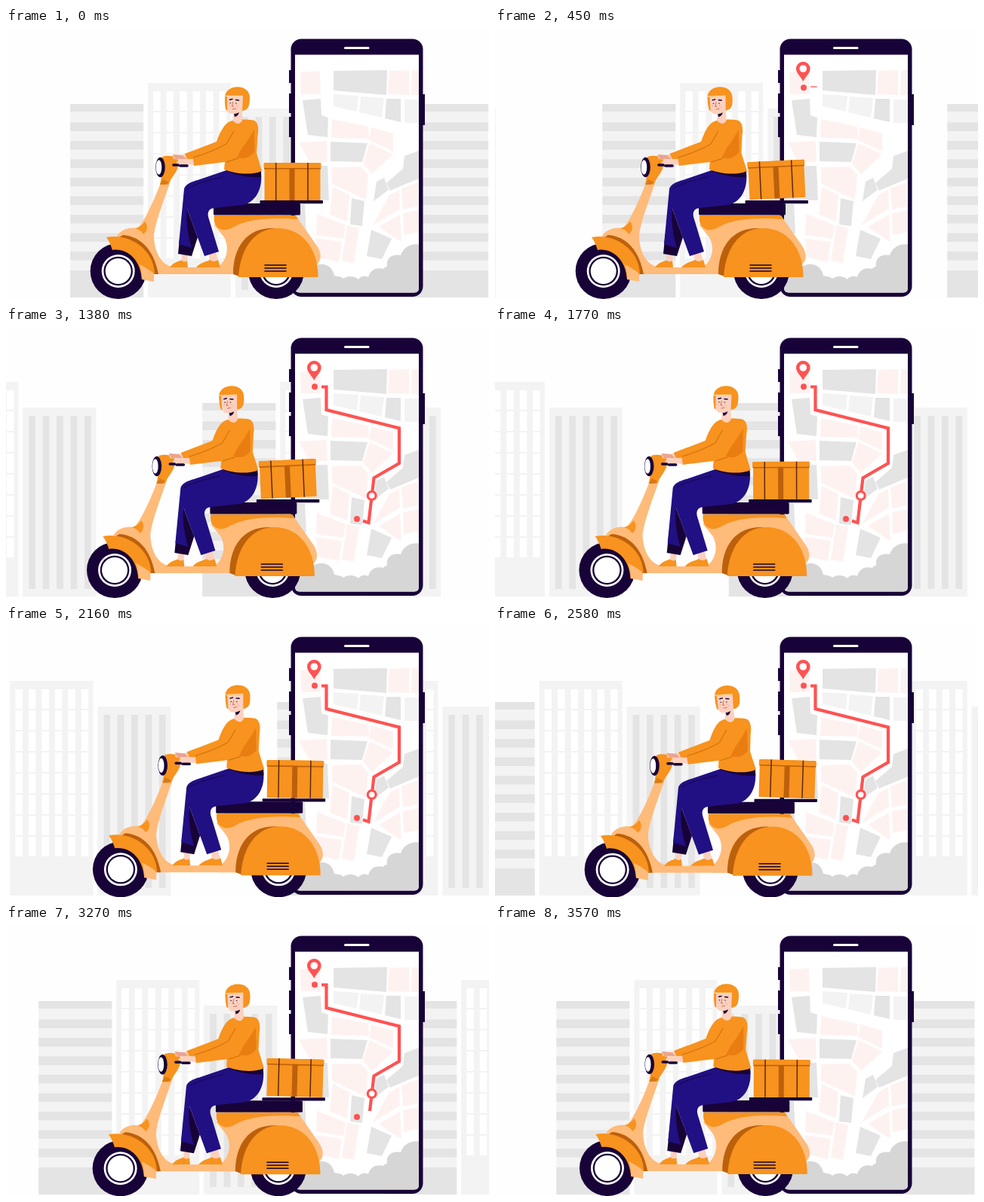
Animation, 640 px wide and 360 px high, one loop 3.6 s. Source, as an HTML page:

```html
<!DOCTYPE html>
<html lang="en">
<head>
<meta charset="utf-8">
<title>Scooter delivery</title>
<style>
  html, body { margin: 0; width: 100%; height: 100%; overflow: hidden; background: #fefefe; }
  svg { display: block; width: 100vw; height: 100vh; }
  .orange { fill: #f7931e } .light { fill: #ffbb7a } .brown { fill: #bd600b } .shade { fill: #e97d12 }
  .navy { fill: #180338 } .blue { fill: #211083 } .skin { fill: #fcd0be } .white { fill: #fff }
  .gray { fill: #e4e4e4 } .pale { fill: #f3f3f3 } .pink { fill: #fef2f1 } .red { fill: #ff5252 }
  .line { fill: none; stroke: #180338; stroke-linecap: round }
</style>
</head>
<body>
<svg viewBox="0 0 640 360">
  <clipPath id="wipe"><rect id="window" x="410" y="77" width="120" height="0"/></clipPath>
  <g id="city"></g>

  <g id="phone">
    <path class="navy" d="M375 56h3v17h-3zM375 87h3v26h-3zM375 118h3v27h-3zM551 88h4v41h-4z"/>
    <rect class="navy" x="377.500" y="14.500" width="175" height="342.500" rx="14"/>
    <path class="white" d="M383 35.500H547V345Q547 351.500 541 351.500H389Q383 351.500 383 345Z"/>
    <path d="M449.500 26.500H480" stroke="#fff" stroke-width="3" stroke-linecap="round"/>
    <g id="map"></g>
    <path fill="#d6d6d6" d="M383 322C395 311 403 318 409 316C420 310 433 316 435 329C440 330 444 330 447 333C452 329 462 329 467 334C470 329 476 329 480 331C482 322 490 317 500 320C501 318 503 317 505 317C503 305 512 300 523 302C526 292 536 286 547 287.500V345Q547 351.500 541 351.500H389Q383 351.500 383 345Z"/>
    <path clip-path="url(#wipe)" fill="none" stroke="#ff5252" stroke-width="4.200" d="M418 79.500H424.500V110L521 134.500V181L487.500 200.500L480.500 260L473 257.500"/>
    <g id="pin">
      <path class="red" d="M408.300 71C405 64 399 60 399 54a9.300 9.300 0 0 1 18.600 0C417.600 60 411.600 64 408.300 71Z"/>
      <circle class="white" cx="408.300" cy="54" r="4.800"/>
    </g>
    <circle id="start" class="red" cx="409" cy="79.300" r="4"/>
    <circle id="stop" cx="484.700" cy="224" r="5.400" fill="#fff" stroke="#ff5252" stroke-width="3.200"/>
    <circle id="end" class="red" cx="465" cy="255" r="4"/>
  </g>

  <g id="bike">
    <g id="wheels"></g>
    <path class="light" d="M207 200L218 203C209 230 196 262 196 278C197 300 208 318 226 318H280C290 312 298 295 289 278L276 262L285 249H384L411 288C419 299 418 309 412 314V327H197C193 300 175 282 147 277C152 267 165 264 174 266C184 258 200 220 207 200Z"/>
    <path class="brown" d="M155 275C180 277 196 296 202 327H194C190 300 177 284 150 278Z"/>
    <path class="orange" d="M133 278C162 272 196 293 197 326L180 334C178 307 160 292 141 295C139 289 137 283 133 278Z"/>
    <path class="light" d="M180 334C180 326 179 320 177 314C186 319 194 323 196 327V337Z"/>
    <path class="orange" d="M184 257C189 264 187 270 182 274C179 269 175 267 171 266C177 265 181 261 184 257Z"/>
    <path class="orange" d="M276 249H384L387 254C350 251 320 254 302 264C294 269 288 269 284 267C277 264 275 257 276 249Z"/>
    <path class="light" d="M280 327C298 322 301 300 306 290L320 300V327Z"/>
    <path class="brown" d="M301 327C301 290 320 264 356 266L334 295L312 331Z"/>
    <path class="orange" d="M308 331C310 294 328 268 357 266C394 264 414 296 413.500 331Z"/>
    <path class="line" stroke-width="1.600" d="M343 315h28M343 319h28M343 323h28"/>
    <rect class="navy" x="275" y="233" width="115" height="15.500" rx="1.500"/>
    <rect class="navy" x="336.500" y="229" width="83.500" height="4.300" rx="1"/>

    <g id="box">
      <path class="orange" d="M342.500 179H416.500V229H342.500Z"/>
      <rect class="orange" x="341.500" y="179" width="76" height="7.500" rx="1.500"/>
      <path class="brown" d="M342 186h75v1.600h-75zM375.500 186h7v43h-7z"/>
      <path d="M357.700 179V229M400 179V229" stroke="#5c2a12" stroke-width="1.500"/>
    </g>

    <path class="orange" d="M204 208C206 200 207 193 207 171C216 168 229 170 229 178C228 192 220 196 215 208Z"/>
    <path class="brown" d="M208 201L216 205L212 208H204Z" opacity=".5"/>
    <ellipse class="navy" cx="204.500" cy="185" rx="6.300" ry="13.200"/>
    <ellipse class="white" cx="202.500" cy="185" rx="3.800" ry="9.800"/>

    <path class="skin" d="M233 300h8l-1 11h-8zM268 297l9-2l4 15h-11z"/>
    <path class="orange" d="M217 318C222 311 229 310 232 308.500Q237 312 240 309L241 318ZM252 318C258 311 265 311 270 308Q275 312 281 308L284 318Z"/>
    <path class="navy" d="M237 232L254 278L246 303L228 300L230 280Z"/>
    <path class="blue" d="M292 189L338 193C340 214 331 231 314 235L276 239C268 240 266 246 269 254L282 297L263 303L240 240C238 258 241 276 246 292L229 287L236 214C237 208 246 204 254 202Z"/>
    <path class="line" stroke-width=".8" d="M241 213C255 205 270 202 287 198"/>

    <g id="rider">
      <path class="navy" d="M292 188L338 190V198C322 199 306 196 292 190Z"/>
      <path class="skin" d="M240 167L232 169L221 168L222 174L240 176Z"/>
      <path fill="#eaa48f" d="M221 168L234 169L239 174L224 174Z"/>
      <path class="orange" d="M297 124C304 121 318 121 328 122.500C335 125 335 135 333.500 143L332 166L339 190C325 196 304 194 289 188L290 178L249 183L247 175L240 174L237 167L279 151C283 140 288 128 297 124Z"/>
      <path class="shade" d="M329 135L329 165C321 174 315 174 306 172L313 159C319 152 324 143 329 135Z"/>
      <path d="M302 137L292 154C280 161 262 168 248 172M292 178L308 173" fill="none" stroke="#bd600b" stroke-width=".8"/>
      <path class="skin" d="M248 174L236 174L228 176L225 181L232 183L239 181L249 182Z"/>
      <g id="head">
        <path class="skin" d="M302 107H313V123Q308 131 300.500 123Z"/>
        <path class="navy" d="M302 113L309 111Q308 117 303 118Z"/>
        <path class="skin" d="M292 89H316V106C309 115 300 115 296 113C292 111 292 103 292 89Z"/>
        <path class="orange" d="M291 108Q289.500 100 290 92C290.500 73.500 323 73.500 323 92C323 104 321 109 313 110L314 91H293V110Z"/>
        <path d="M290.500 90.300H314" stroke="#ffdca8" stroke-width="1.200"/>
        <path class="line" stroke-width="1.500" d="M296.500 95.200L300 94.500M304.500 95.500L308.500 96"/>
        <path class="line" stroke-width=".9" d="M297 99.800h.8M304.500 100h.8"/>
        <path d="M301 98L299.500 104H302M300 108L305 107M296 103h.6M305 103h.6M307 105h.6" fill="none" stroke="#c4563f" stroke-width=".8"/>
      </g>
    </g>
    <path class="line" stroke-width="3.600" stroke-linecap="butt" d="M222 182H228M231 183H240"/>
    <path class="skin" d="M226 177L238 174L240 179L230 181Z"/>
  </g>
</svg>
<script>
const LOOP = 3600, SPAN = 457;
const $ = id => document.getElementById(id);
const rect = (cls, x, y, w, h) => `<rect class="${cls}" x="${x}" y="${y}" width="${w}" height="${h}"/>`;
const repeat = (n, draw) => Array.from({ length: n }, (_, i) => draw(i)).join('');

const block =
  rect('pale', 85, 101, 97, 257) +
  repeat(9, i => rect('gray', 85, 101 + i * 24.5, 97, i ? 11.5 : 10)) +
  rect('gray', 85, 322, 97, 36) +
  rect('pale', 188, 73, 110, 285) +
  repeat(48, i => rect('white', 195 + (i % 6) * 17.5, 84 + Math.floor(i / 6) * 28, 9.5, 26)) +
  rect('pale', 304, 107, 97, 251) +
  repeat(5, i => rect('gray', 312 + i * 18.4, 118, 8.7, 230));
$('city').innerHTML = repeat(3, i => `<g transform="translate(${(i - 1) * SPAN})">${block}</g>`);

const streets = {
  gray: `M434 57L505 56L504 89L434 83ZM504 94H523V125L502 120ZM393 96L417 94L418 116L427 119L426 145L400 142Z
    M430 151L479 153L472 178L430 177ZM547 163V200L509 216L504 206L526 187L528 170ZM491 204L501 199L507 215L487 230Z
    M458 226L475 230L472 263L456 261ZM484 268L511 280L498 307L478 303ZM383 184L426 183L428 229H383ZM383 234H396L398 273H383Z`,
  pale: 'M434 88L467 90L465 111L434 104ZM470 91L501 93L498 119L468 112ZM528 95H547V126H528Z',
  pink: `M390 59L416 57L417 88L391 88ZM508 57L534 56V89L506 88ZM538 56H547V89H537ZM432 121L480 131L481 147L431 146Z
    M484 132L513 140V164L481 149ZM482 153L513 168L485 194L473 180ZM388 152L425 150L426 178H402Z
    M432 185L470 184L480 195L477 228L432 207ZM433 211L455 222L452 257L429 248Z
    M524 213L546 205V237L526 241ZM508 222L521 215L522 240L486 262ZM526 246L547 242V271L527 275Z
    M494 264L522 248L524 284L515 279ZM412 247L450 262L447 280L411 275ZM410 279L445 284L441 311L414 305Z
    M452 262L468 266L461 312L445 309Z`
};
$('map').innerHTML = Object.entries(streets).map(([cls, d]) => `<path class="${cls}" d="${d}"/>`).join('');

const discs = [['navy', 37], ['white', 22], ['navy', 19.3], ['white', 17]];
$('wheels').innerHTML = [148.7, 358].map(x =>
  discs.map(([cls, r]) => `<circle class="${cls}" cx="${x}" cy="323" r="${r}"/>`).join('')).join('');

const RIDE = [[0, 0], [900, -10], [1800, 0], [2700, 8], [3600, 0]];
const LEAN = [[0, 0], [900, 1], [1800, 0], [2700, 1], [3600, 0]];
const TILT = [[0, 0], [450, -2.7], [900, 0], [1350, -2.7], [1800, 0], [2160, .8], [3000, 2.7], [3600, 0]];

function at(keys, t) {
  const i = Math.max(1, keys.findIndex(([time]) => time >= t));
  const [t0, v0] = keys[i - 1], [t1, v1] = keys[i];
  return v0 + (v1 - v0) * (t - t0) / (t1 - t0);
}
const ramp = (t, from, to) => Math.min(1, Math.max(0, (t - from) / (to - from)));
const move = (id, transform) => $(id).setAttribute('transform', transform);

function pop(id, x, y, t, from) {
  const p = ramp(t, from, from + 180) * (1 - ramp(t, 3300, 3480));
  const s = p * p * (3 - 2 * p);
  move(id, `translate(${x} ${y}) scale(${s}) translate(${-x} ${-y})`);
}

function draw(t) {
  const x = at(RIDE, t), lean = at(LEAN, t), tilt = at(TILT, t);
  move('city', `translate(${SPAN * t / LOOP})`);
  move('bike', `translate(${x} ${Math.max(0, x) * .1})`);
  move('rider', `translate(0 190) skewX(${2.5 * lean}) translate(0 -190)`);
  move('head', `rotate(${-5 * lean} 308 122)`);
  move('box', `translate(0 ${-Math.abs(tilt) * .3}) rotate(${tilt} ${tilt < 0 ? 342 : 417} 229)`);

  pop('pin', 408.3, 71, t, 180);
  pop('start', 409, 79.3, t, 240);
  pop('stop', 484.7, 224, t, 900);
  pop('end', 465, 255, t, 1000);
  $('window').setAttribute('height', 187 * ramp(t, 447, 850) * (1 - ramp(t, 3250, 3480)));
}

function frame() {
  draw(performance.now() % LOOP);
  requestAnimationFrame(frame);
}
frame();
</script>
</body>
</html>
```
